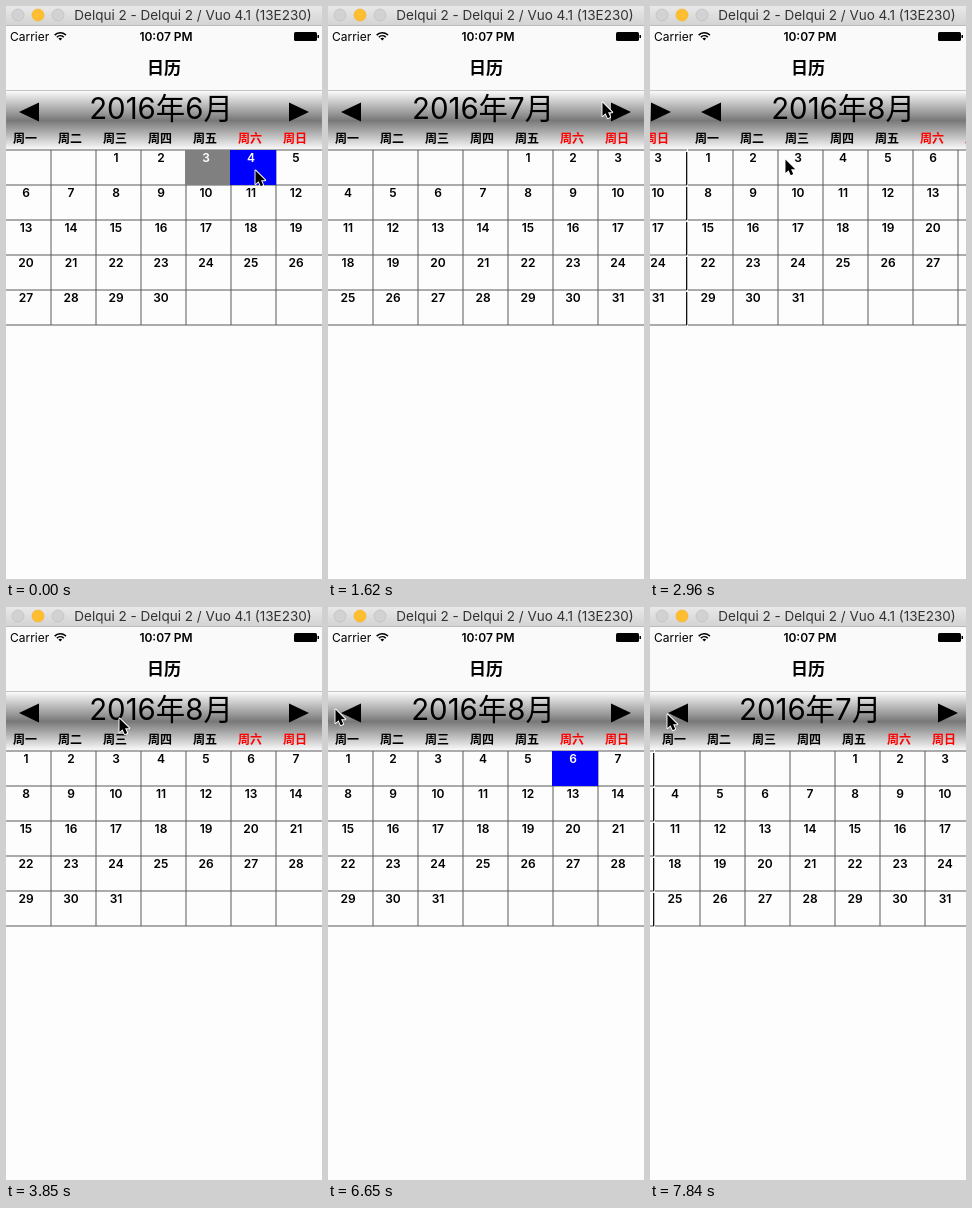
Animation, 316 px wide and 573 px high, one loop 7990 ms. Source, as an HTML page with a canvas:

```html
<!DOCTYPE html>
<html lang="zh">
<head>
<meta charset="utf-8">
<title>日历</title>
<style>
html, body { margin: 0; width: 100%; height: 100%; overflow: hidden; background: #fdfdfd; }
canvas { display: block; width: 316px; height: 573px; }
</style>
</head>
<body>
<canvas id="stage"></canvas>
<script>
const W = 316, H = 573, PAGE = 320, COL = 45, ROW = 35, TOP = 144;
const LOOP = 7990, STEPS = 54, STEP = LOOP / STEPS;
const SANS = 'Inter, "Noto Sans CJK SC", "Noto Sans CJK", sans-serif';
const BLUE = '#0000ff', LINE = '#5a5a5a';

const canvas = document.getElementById('stage');
const ctx = canvas.getContext('2d');
const dpr = window.devicePixelRatio || 1;
canvas.width = W * dpr;
canvas.height = H * dpr;

const clamp = u => Math.min(1, Math.max(0, u));
const ease = u => u * u * (3 - 2 * u);

const months = [6, 7, 8].map(m => ({
  name: `2016年${m}月`,
  first: (new Date(2016, m - 1, 1).getDay() + 6) % 7,
  days: new Date(2016, m, 0).getDate()
}));

// Pointer gestures: start step, end step, where the tip comes to rest
const home = [249, 164];
const gestures = [
  [0, 6, [288, 95]],     // to the next button
  [8, 11, [274, 96]],
  [11, 14, [285, 153]],  // onto the grid
  [17, 20, [135, 153]],  // drag left
  [20, 23, [98, 313]],
  [23, 26, [113, 111]],
  [26, 30, [103, 285]],  // press the 31st
  [32, 33, [172, 233]],
  [33, 37, [244, 130]],
  [38, 41, [241, 165]],  // press the 6th
  [42, 45, [7, 102]],    // to the previous button
  [46, 50, [17, 107]]
];

function pointerAt(n) {
  return gestures.reduce((from, [start, end, to]) => {
    const u = ease(clamp((n - start) / (end - start)));
    return from.map((v, i) => v + (to[i] - v) * u);
  }, home).map(Math.round);
}

// Animated page change that begins just before step `start`
const slide = (n, start) => ease(clamp(((n - start) * STEP + 22) / 300));

// Finger drag, then settling on the next page
function drag(n) {
  if (n < 18) return 0;
  return n >= 23 ? 1 : 1 - (1 - 38.5 / PAGE) * Math.exp(18 - n);
}

function scrollAt(n) {
  const pages = slide(n, 8) + drag(n) - slide(n, 47) - slide(n, 53);
  return Math.round(PAGE * pages * 2) / 2;
}

function marksAt(n, month) {
  if (month === 0) return { 3: '#808080', 4: BLUE };
  if (month === 2 && n >= 33) return { [n < 39 ? 31 : 6]: BLUE };
  return {};
}

function rect(x, y, w, h, color) {
  ctx.fillStyle = color;
  ctx.fillRect(x, y, w, h);
}

function text(str, x, y, size, weight, color = '#000', align = 'center') {
  ctx.font = `${weight} ${size}px ${SANS}`;
  ctx.textAlign = align;
  ctx.fillStyle = color;
  ctx.fillText(str, x, y);
}

function disc(x, fill, edge) {
  ctx.beginPath();
  ctx.arc(x, 9, 6, 0, Math.PI * 2);
  ctx.fillStyle = fill;
  ctx.fill();
  ctx.strokeStyle = edge;
  ctx.lineWidth = 0.7;
  ctx.stroke();
}

function polygon(points) {
  ctx.beginPath();
  points.forEach(p => ctx.lineTo(...p));
  ctx.closePath();
}

function triangle(tip, base) {
  polygon([[tip, 106], [base, 96.5], [base, 115.5]]);
  ctx.fillStyle = '#000';
  ctx.fill();
}

function vertical(y0, y1, stops) {
  const g = ctx.createLinearGradient(0, y0, 0, y1);
  stops.forEach((c, i) => g.addColorStop(i / (stops.length - 1), c));
  return g;
}

function drawWindowBar() {
  rect(0, 0, W, 20, vertical(0, 20, ['#e9e9e9', '#d2d2d2']));
  rect(0, 19, W, 1, '#bcbcbc');
  disc(12, '#d2d2d2', '#bdbdbd');
  disc(32, '#ffbe2f', '#f3b32c');
  disc(52, '#d2d2d2', '#bdbdbd');
  text('Delqui 2 - Delqui 2 / Vuo 4.1 (13E230)', 187, 14, 13.5, 400, '#333');
}

function drawWifi() {
  const fan = r => ctx.arc(54.3, 34.4, r, -Math.PI * 0.76, -Math.PI * 0.24);
  ctx.strokeStyle = ctx.fillStyle = '#000';
  ctx.lineWidth = 1.6;
  for (const r of [4.7, 7.7]) {
    ctx.beginPath();
    fan(r);
    ctx.stroke();
  }
  ctx.beginPath();
  ctx.moveTo(54.3, 34.4);
  fan(2.6);
  ctx.fill();
}

function drawStatus() {
  rect(0, 20, W, 64, '#fafafa');
  text('Carrier', 4, 34.5, 12, 400, '#000', 'left');
  drawWifi();
  text('10:07 PM', 160, 34.5, 12, 600);
  ctx.beginPath();
  ctx.roundRect(288, 26, 23, 9, 1.6);
  ctx.fill();
  rect(311.5, 29, 1.5, 3, '#000');
  text('日历', 158, 68, 17, 600);
  rect(0, 84, W, 1, '#c4c4c4');
}

function drawHeader(name) {
  triangle(13, 33);
  triangle(303, 283);
  text(name, 155, 113, 29.4, 400);
  [...'一二三四五六日'].forEach((d, i) =>
    text('周' + d, 19 + COL * i, 136.5, 12, 600, i > 4 ? '#f00' : '#000'));
}

function drawGrid() {
  for (let r = 0; r <= 5; r++) rect(0, TOP - 0.5 + ROW * r, PAGE - 1, 1, LINE);
  for (let c = 1; c < 7; c++) rect(COL * c - 0.5, TOP, 1, ROW * 5, LINE);
  for (let r = 0; r < 5; r++) rect(PAGE - 2, TOP + 2 + ROW * r, 1.3, ROW - 2, '#111');
}

function drawMonth(month, marks) {
  drawHeader(month.name);
  drawGrid();
  for (let d = 1; d <= month.days; d++) {
    const cell = d - 1 + month.first;
    const x = COL * (cell % 7), y = TOP + ROW * Math.floor(cell / 7);
    if (marks[d]) rect(x - 1, y, COL + 1, ROW, marks[d]);
    text(d, x + 20, y + 12, 12, 600, marks[d] ? '#fff' : '#000');
  }
}

function drawPointer(x, y) {
  ctx.save();
  ctx.translate(x, y);
  ctx.scale(0.93, 0.93);
  polygon([[0.5, 0.5], [0.5, 15], [3.8, 12], [6.2, 17.4], [8.8, 16.2], [6.5, 11], [11, 11]]);
  ctx.lineJoin = 'round';
  ctx.lineWidth = 2;
  ctx.strokeStyle = '#fff';
  ctx.stroke();
  ctx.fillStyle = '#000';
  ctx.fill();
  ctx.restore();
}

function draw(n) {
  ctx.setTransform(dpr, 0, 0, dpr, 0, 0);
  rect(0, 0, W, H, '#fdfdfd');
  drawWindowBar();
  drawStatus();
  rect(0, 85, W, 59, vertical(85, 144, ['#fafafa', '#787878', '#fdfdfd']));
  const scroll = scrollAt(n);
  months.forEach((month, i) => {
    const x = PAGE * i - scroll;
    if (Math.abs(x) >= PAGE) return;
    ctx.save();
    ctx.translate(x, 0);
    drawMonth(month, marksAt(n, i));
    ctx.restore();
  });
  drawPointer(...pointerAt(n));
}

// The picture advances in even steps; the small lead absorbs rounding
const begin = performance.now();
function tick() {
  const t = (performance.now() - begin) % LOOP;
  draw(Math.min(STEPS - 1, Math.floor((t + 12) / STEP)));
  requestAnimationFrame(tick);
}
tick();
</script>
</body>
</html>
```
